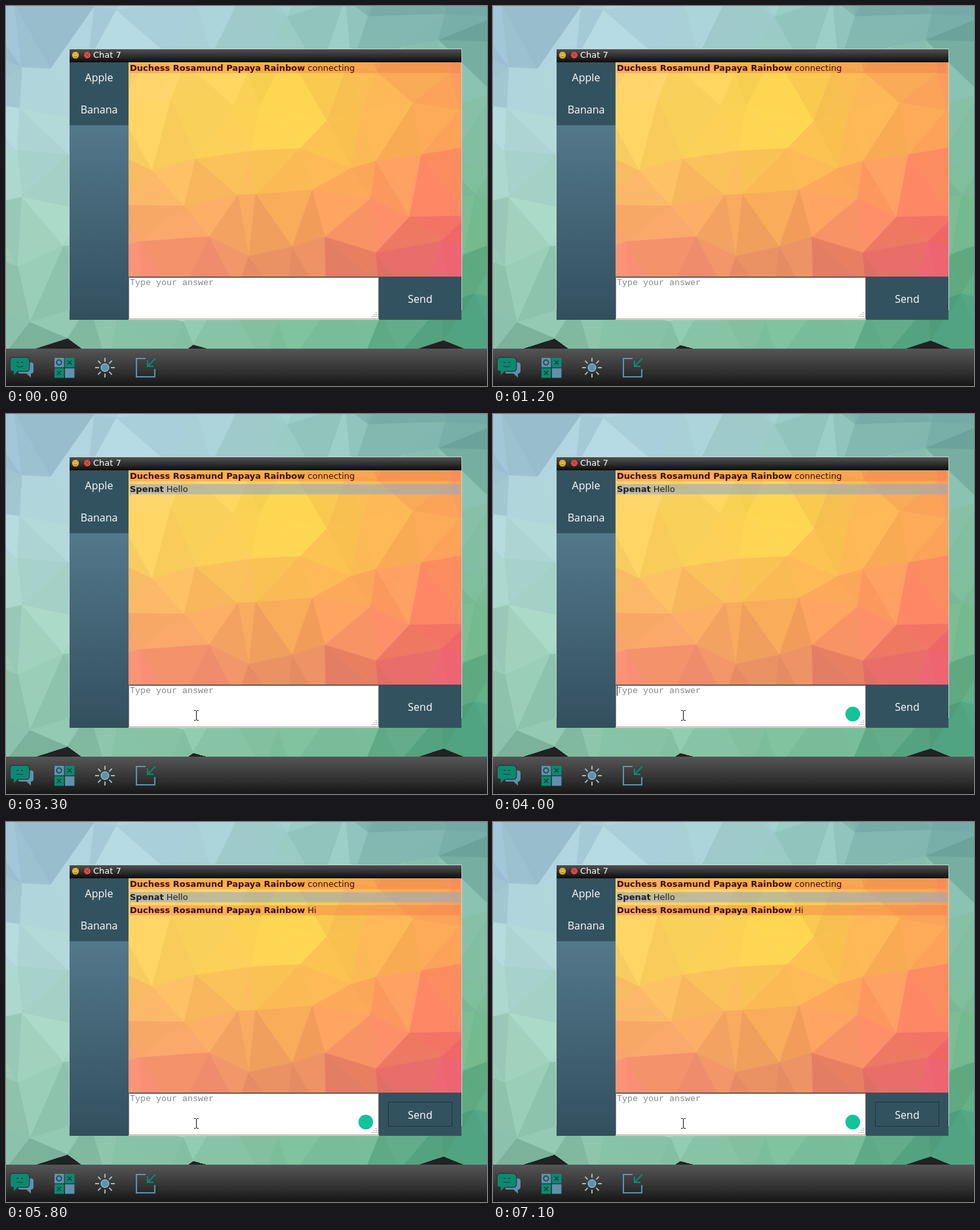
These frames come from a looping animation (734x580 px, 7.2 s). An HTML page with a canvas:

```html
<!DOCTYPE html>
<html lang="en">
<head>
<meta charset="utf-8">
<title>Chat window</title>
<style>
html, body { margin: 0; width: 100%; height: 100%; overflow: hidden; background: #222; }
canvas { display: block; }
</style>
</head>
<body>
<canvas id="stage" width="734" height="580"></canvas>
<script>
const W = 734, H = 580, LOOP = 7200;
const TEAL = '#0b8a72', BLUE = '#5d92ad', SLATE = '#33525f', RIM = '#c2d6d4';
const SANS = '13px "DejaVu Sans", sans-serif';
const LABEL = '16px "Open Sans", sans-serif';
const MONO = '13.333px "Liberation Mono", monospace';
const PRINCESS = 'Duchess Rosamund Papaya Rainbow', FRIEND = 'Spenat';

// When each step of the conversation happens, in ms
const HELLO = 1800, POINTER = 3200, FOCUS = 3600, TYPING = 4300, KEY = 200;
const TAB = 4700, SENT = 4800, CHECKED = 5600;

// Colours laid out over the area they cover, blended in between
const SEA = ['98bcd2 a9cfdc 93c6c0 6ca2a0', 'b2d8dc c4e6e2 98cebd 86c0a6',
  '98cab6 aedac6 8cc6a4 6db286', '7fb6a0 8bc8aa 72b692 439a7a'];
const SUNSET = ['fcd070 fcd650 fc9c60', 'fdd464 fcd24e fda25a',
  'fcb36c fcb05a fd7868', 'fd9078 e68f63 e85c70'];

const stage = document.getElementById('stage').getContext('2d');
const scenery = document.createElement('canvas');
scenery.width = W;
scenery.height = H;
let g = scenery.getContext('2d');

function box(x, y, w, h, fill) {
  g.fillStyle = fill;
  g.fillRect(x, y, w, h);
}

function fade(y0, y1, ...colors) {
  const gradient = g.createLinearGradient(0, y0, 0, y1);
  colors.forEach((c, i) => gradient.addColorStop(i / (colors.length - 1), c));
  return gradient;
}

function disc(x, y, r, fill) {
  g.fillStyle = fill;
  g.beginPath();
  g.arc(x, y, r, 0, 7);
  g.fill();
}

function arc(x, y, r, from, to, color, width) {
  g.strokeStyle = color;
  g.lineWidth = width;
  g.beginPath();
  g.arc(x, y, r, from, to);
  g.stroke();
}

function line(d, color, width = 1) {
  g.strokeStyle = color;
  g.lineWidth = width;
  g.stroke(new Path2D(d));
}

function shape(d, fill) {
  g.fillStyle = fill;
  g.fill(new Path2D(d));
}

function text(s, x, y, font, color, align = 'left') {
  g.font = font;
  g.fillStyle = color;
  g.textAlign = align;
  g.fillText(s, x, y);
  return g.measureText(s).width;
}

function randomFrom(seed) {
  return () => (seed = seed * 16807 % 2147483647) / 2147483647;
}

function bilinear(rows, u, v) {
  const grid = rows.map(row => row.split(' ').map(hex => parseInt(hex, 16)));
  const place = (t, n) => {
    const p = Math.min(Math.max(t, 0), 1) * (n - 1), i = Math.min(Math.floor(p), n - 2);
    return [i, p - i];
  };
  const [i, fx] = place(u, grid[0].length), [j, fy] = place(v, grid.length);
  const mix = (a, b, f) => a + (b - a) * f;
  return [16, 8, 0].map(bits => {
    const at = (r, c) => grid[r][c] >> bits & 255;
    return mix(mix(at(j, i), at(j, i + 1), fx), mix(at(j + 1, i), at(j + 1, i + 1), fx), fy);
  });
}

// Low-poly backdrop: a staggered, jittered grid of triangles
function mesh(left, top, width, height, cell, palette, vary, seed) {
  const random = randomFrom(seed), rows = [];
  for (let y = -cell; y <= height + cell; y += cell) {
    const row = [], stagger = rows.length % 2 * cell / 2;
    for (let x = -cell; x <= width + 2 * cell; x += cell)
      row.push([left + x - stagger + (random() - 0.5) * cell * 0.7,
                top + y + (random() - 0.5) * cell * 0.7]);
    rows.push(row);
  }
  const facet = (...tri) => {
    const [x, y] = [0, 1].map(k => (tri[0][k] + tri[1][k] + tri[2][k]) / 3);
    const shift = (random() - 0.5) * vary;
    const rgb = bilinear(palette, (x - left) / width, (y - top) / height);
    const color = `rgb(${rgb.map(v => Math.round(v + shift))})`, d = 'M' + tri.join('L') + 'Z';
    shape(d, color);
    line(d, color, 0.6);
  };
  g.save();
  g.beginPath();
  g.rect(left, top, width, height);
  g.clip();
  for (let j = 1; j < rows.length; j++)
    for (let i = 1; i < rows[j].length; i++) {
      const a = rows[j - 1][i - 1], b = rows[j - 1][i], c = rows[j][i - 1], d = rows[j][i];
      if (j % 2) { facet(a, b, d); facet(a, c, d); }
      else { facet(a, b, c); facet(b, c, d); }
    }
  g.restore();
}

function drawTaskbar() {
  box(0, 523, W, 57, fade(523, 580, '#555', '#383838', '#161616'));

  shape('M22 544h16q4 0 4 4v9q0 4-4 4v6l-7-6h-9q-4 0-4-4v-9q0-4 4-4z', BLUE);
  const bubble = 'M11 537h20q4 0 4 4v12q0 4-4 4H18l-6 6v-6h-1q-4 0-4-4v-12q0-4 4-4z';
  line(bubble, '#333', 2.5);
  shape(bubble, TEAL);

  for (let i = 0; i < 4; i++) {
    const x = 74 + i % 2 * 16, y = 537 + (i >> 1) * 16, cx = x + 7, cy = y + 7;
    box(x, y, 14.5, 14.5, i % 3 ? TEAL : BLUE);
    if (i === 0) arc(cx, cy, 3.7, 0, 7, '#163b4c', 1.5);
    else if (i < 3) line(`M${cx - 3} ${cy - 3}l6 6m0-6l-6 6`, '#123c39', 1.5);
  }

  for (let i = 0; i < 8; i++) {
    const c = Math.cos(i * Math.PI / 4), s = Math.sin(i * Math.PI / 4);
    line(`M${151 + 9 * c} ${552 + 9 * s}L${151 + 15 * c} ${552 + 15 * s}`, '#a5c9d2', 1.8);
  }
  disc(151, 552, 6.5, '#a5c9d2');
  disc(151, 552, 5.4, BLUE);

  line('M213 538H199V566H227V554', BLUE, 2);
  line('M228 538L216 550M216 541V550H225', TEAL, 2);
}

function drawWindow() {
  box(96, 65, 600, 399, RIM);
  box(97, 66, 598, 20, fade(66, 86, '#505050', '#303030', '#0c0c0c'));
  disc(106, 75, 5.2, '#e2b83a');
  line('M103.5 73h1m3 0h1M103.5 77q2.5 2 5 0', '#8c611b');
  disc(124, 75, 5, '#dc4a40');
  line('M122 73l4 4m0-4l-4 4', '#b5352f');
  text('Chat 7', 133, 79, SANS, '#fff');

  box(97, 86, 90, 393, fade(182, 479, '#53788a', '#324f5e'));
  box(97, 86, 90, 96, SLATE);
  mesh(187, 86, 508, 327, 72, SUNSET, 11, 5);
  box(187, 413, 508, 66, SLATE);
  text('Apple', 142, 115, LABEL, '#fff', 'center');
  text('Banana', 142, 164, LABEL, '#fff', 'center');
  text('Send', 632, 453, LABEL, '#fff', 'center');

  box(187, 414, 382, 65, '#8d8080');
  box(188, 415, 380, 62, '#fff');
  box(187, 477, 382, 1, '#c39a92');
  box(187, 478, 382, 1, '#dfe5e2');
  for (let i = 0; i < 3; i++)
    for (let j = 0; j <= i; j++) box(564 - j * 3, 467 + i * 3, 1.5, 1.5, '#a2a2a2');
}

function drawMessage(row, name, words) {
  const y = 87 + row * 20, own = name === PRINCESS, ink = own ? '#3d080b' : '#1b1b2c';
  box(189, y, 504, 15.5, own ? 'rgba(240,120,70,.4)' : 'rgba(150,170,190,.6)');
  const width = text(name, 189, y + 12, `bold ${SANS}`, ink);
  text(words, 193 + width, y + 12, SANS, ink);
}

function drawFace(smiling) {
  line('M16 544h3m4 0h3', '#07453f', 1.4);
  line(smiling ? 'M16 549q5 4 10 0' : 'M16 550h10', '#07453f', 1.2);
}

function drawPointer() {
  line('M287 452.5h2.5l1 1 1-1h2.5M290.5 453v14M287 467.5h2.5l1-1 1 1h2.5', '#111');
}

function drawBadge(t) {
  disc(549, 458, 11.2, '#15c39a');
  if (t < TYPING || t >= CHECKED) return;
  const turn = 0.2 + (t - 5100) / 800 * 2 * Math.PI;
  arc(549, 458, 6, turn, turn + 2.8, '#d5f5ec', 1.6);
}

function drawFocusRing() {
  g.setLineDash([1, 1]);
  g.strokeStyle = '#0d181d';
  g.lineWidth = 1;
  g.strokeRect(583.5, 427.5, 97, 37);
  g.setLineDash([]);
}

function drawAnswer(t) {
  const count = t < SENT ? Math.max(0, Math.floor((t - TYPING) / KEY) + 1) : 0;
  const typed = 'Hi'.slice(0, count);
  text(typed || 'Type your answer', 189, 426, MONO, typed ? '#111' : '#858585');
  const caretOn = t >= FOCUS && t < TAB && (t - FOCUS) % 1000 < 500;
  if (caretOn) box(189 + typed.length * 8, 415, 1, 15, '#111');
}

function render(t) {
  g.drawImage(scenery, 0, 0);
  drawFace(t < HELLO);
  drawMessage(0, PRINCESS, 'connecting');
  if (t >= HELLO) drawMessage(1, FRIEND, 'Hello');
  if (t >= SENT) drawMessage(2, PRINCESS, 'Hi');
  drawAnswer(t);
  if (t >= POINTER) drawPointer();
  if (t >= FOCUS) drawBadge(t);
  if (t >= TAB) drawFocusRing();
}

mesh(0, 0, W, 523, 76, SEA, 20, 11);
drawWindow();
drawTaskbar();
g = stage;

const start = performance.now();
function tick() {
  render((performance.now() - start) % LOOP);
  requestAnimationFrame(tick);
}
tick();
</script>
</body>
</html>
```
